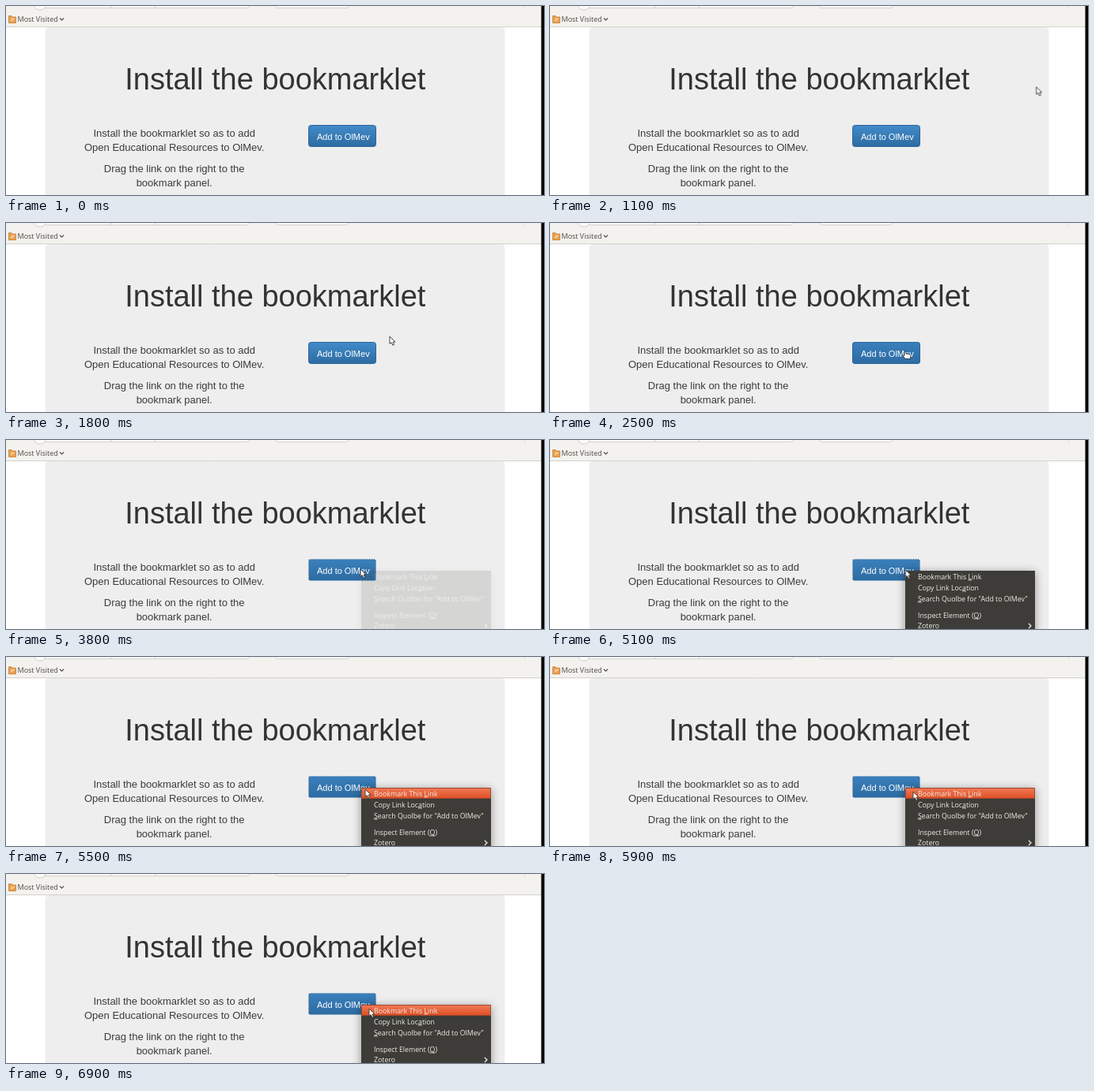
An HTML page that plays this animation: 680 by 240 pixels, repeating every 8000 ms.

```html
<!DOCTYPE html>
<html lang="en">
<head>
<meta charset="utf-8">
<title>Install the bookmarklet</title>
<style>
html, body { margin: 0; width: 100%; height: 100%; overflow: hidden; background: #fff; }
svg { display: block; width: 680px; height: 240px; }
text { white-space: pre; }
.page { font: 13px "Liberation Sans", Arial, sans-serif; fill: #3c3c3c; text-anchor: middle; }
.page .title { font-size: 38px; fill: #333; }
.page .label { font-size: 11px; fill: #fff; text-anchor: start; }
.ui { font: 500 9px "Open Sans", "Noto Sans", sans-serif; fill: #4a4a48; }
.menu .ui { font-size: 8.8px; fill: #f0ece4; }
.menu .panel { filter: drop-shadow(0 2px 6px rgba(0, 0, 0, .4)); }
.key { text-decoration: underline; }

/* One loop is 8 s; 1.25% is one 100 ms step. */
.menu, .cursor, .arrow, .hand, .hover, .focus, .selected { animation: 8s step-end infinite; }
.cursor { animation-name: travel; }
.arrow { animation-name: arrow; }
.hand { animation-name: hand; }
.hover { animation-name: hover; }
.focus { animation-name: focus; }
.menu { animation-name: open; }
.selected { animation-name: select; }

@keyframes travel {
  0% { opacity: 0; transform: translate(664px, 88px); }
  11.25% { opacity: 1; transform: translate(664px, 88px); animation-timing-function: steps(3); }
  15% { opacity: 1; transform: translate(590px, 110px); animation-timing-function: steps(3); }
  18.75% { opacity: 1; transform: translate(524px, 131px); animation-timing-function: steps(3); }
  22.5% { opacity: 1; transform: translate(485px, 144px); animation-timing-function: steps(3); }
  26.25% { opacity: 1; transform: translate(465px, 154px); animation-timing-function: steps(4); }
  31.25% { opacity: 1; transform: translate(448px, 164px); }
  62.5% { opacity: 1; transform: translate(448px, 164px); animation-timing-function: steps(9); }
  73.75%, 100% { opacity: 1; transform: translate(459px, 171px); }
}
@keyframes arrow { 0%, 46.25% { opacity: 1; } 26.25% { opacity: 0; } 100% { opacity: 1; } }
@keyframes hand { 0%, 46.25% { opacity: 0; } 26.25% { opacity: 1; } 100% { opacity: 0; } }
@keyframes hover { 0% { opacity: 0; } 26.25%, 100% { opacity: 1; } }
@keyframes focus { 0% { opacity: 0; } 45%, 100% { opacity: 1; } }
@keyframes open {
  0% { opacity: 0; }
  47.5% { opacity: .14; }
  48.75% { opacity: .6; }
  50%, 100% { opacity: 1; }
}
@keyframes select { 0% { opacity: 0; } 66.25%, 100% { opacity: 1; } }
</style>
</head>
<body>
<svg viewBox="0 0 680 240">
  <defs>
    <linearGradient id="blue" x2="0" y2="1">
      <stop stop-color="#428bca"/><stop offset="1" stop-color="#2d6ca2"/>
    </linearGradient>
    <linearGradient id="deepBlue" x2="0" y2="1">
      <stop stop-color="#3a7fbc"/><stop offset="1" stop-color="#2d6ca2"/>
    </linearGradient>
    <linearGradient id="orange" x2="0" y2="1">
      <stop stop-color="#f07a55"/><stop offset="1" stop-color="#dd4f26"/>
    </linearGradient>
  </defs>

  <rect width="680" height="240" fill="#fff"/>
  <path d="M49.500 240V32q0-5 5-5H625.500q5 0 5 5V240Z" fill="#eee"/>

  <g class="toolbar">
    <rect width="677" height="26" fill="#f3f2ee"/>
    <path d="M0 26.500H677" stroke="#d3d1cc"/>
    <g fill="#fbfbfa" stroke="#d2d0cb">
      <path d="M48-1H306.500V.5q0 2-2 2H48Z"/>
      <path d="M341.500-1V.5q0 2 2 2H430.500q2 0 2-2V-1Z"/>
      <circle cx="43" cy="-3" r="8"/>
      <path d="M132.500 0V2M188.500 0V2"/>
      <path d="M655.500 0V4" stroke="#e2e0db"/>
    </g>
    <path d="M3.500 12.500H7l1 1.500h4.500v7.500h-9Z" fill="#e9a04f" stroke="#d08a48"/>
    <path d="M6 16.500h5M6 18.500h3" stroke="#fbe3c4"/>
    <text class="ui" x="14.500" y="20">Most Visited</text>
    <path d="M68 15.500l2.500 2.500 2.500-2.500" fill="none" stroke="#4a4a48" stroke-width="1.100"/>
  </g>

  <g class="page">
    <text class="title" x="340.300" y="106">Install the bookmarklet</text>
    <text x="212.700" y="166">Install the bookmarklet so as to add</text>
    <text x="212.700" y="184">Open Educational Resources to OlMev.</text>
    <text x="212.700" y="211">Drag the link on the right to the</text>
    <text x="212.700" y="229">bookmark panel.</text>
    <g stroke="#2b669a">
      <rect x="382.500" y="151.500" width="85" height="27" rx="3" fill="url(#blue)"/>
      <rect class="hover" x="382.500" y="151.500" width="85" height="27" rx="3" fill="url(#deepBlue)"/>
    </g>
    <rect class="focus" x="382.500" y="151.500" width="85" height="27" fill="none" stroke="#dfe6ec" stroke-dasharray="1 1" stroke-dashoffset=".5"/>
    <text class="label" x="393" y="170">Add to OlMev</text>
  </g>

  <g class="menu">
    <rect class="panel" x="449" y="166" width="164" height="90" fill="#3d3c38"/>
    <rect class="selected" x="449.500" y="166.500" width="163" height="13" fill="url(#orange)" stroke="#a8452a"/>
    <g class="ui">
      <text x="465" y="176.500">Bookmark This <tspan class="key">L</tspan>ink</text>
      <text x="465" y="190.500">Copy Link Loc<tspan class="key">a</tspan>tion</text>
      <text x="465" y="204.500"><tspan class="key">S</tspan>earch Quolbe for "Add to OlMev"</text>
      <text x="465" y="225.500">Inspect Element (<tspan class="key">Q</tspan>)</text>
      <text x="465" y="239">Zotero</text>
    </g>
    <path d="M605 233l3 3-3 3" fill="none" stroke="#f0ece4" stroke-width="1.300"/>
  </g>

  <rect x="676.500" width="4" height="240" fill="#000"/>

  <g class="cursor" fill="#fff" stroke="#333" stroke-width=".9" stroke-linejoin="round">
    <path class="arrow" d="M0 0V9.500L2.200 7.600 3.800 11.200 5.600 10.400 4 7H7Z"/>
    <path class="hand" d="M0-.5q1-1.500 2 0V2l4.500.7q1.500.3 1.500 2L7 8.500H1.500L-2 5q0-1.700 2-.7Z"/>
  </g>
</svg>
</body>
</html>
```
